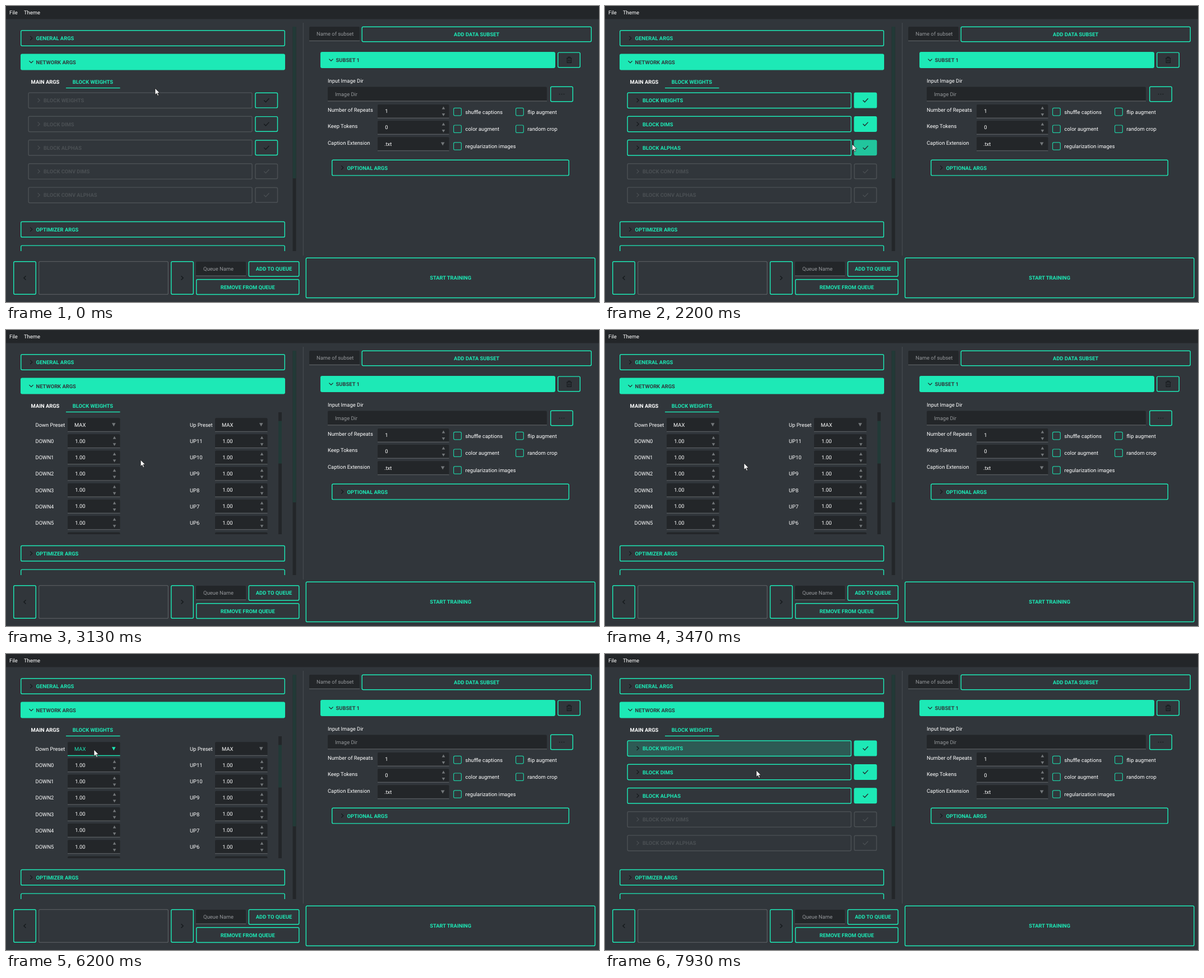
An HTML page for the animation above (8 s loop, 1058 px wide and 529 px high).

```html
<!DOCTYPE html>
<html lang="en">
<head>
<meta charset="utf-8">
<title>Training settings</title>
<style>
html, body { margin: 0; width: 100%; height: 100%; overflow: hidden; background: #31363b; }
svg { display: block; width: 1058px; height: 529px; }
text { font: 9.4px Roboto, sans-serif; fill: #fff; text-rendering: geometricPrecision; white-space: pre; }
.b { font-weight: 700; }
</style>
</head>
<body>
<svg viewBox="0 0 1058 529">
  <defs>
    <clipPath id="left"><rect x="0" y="30" width="530" height="408"/></clipPath>
    <clipPath id="panel"><rect x="26" y="147" width="468" height="218"/></clipPath>
    <clipPath id="combo"><rect x="110" y="140" width="65" height="240"/></clipPath>
  </defs>
  <g id="base"></g>
  <g id="live" clip-path="url(#panel)"></g>
  <path id="cursor" d="M0 0V11.6L2.7 9.1 4.6 13.4 6.5 12.6 4.6 8.4H8.2Z" fill="#fff" stroke="#111" stroke-width=".7"/>
</svg>
<script>
const LOOP = 8000;
const TEAL = '#1de9b6', BG = '#31363b', DARK = '#232629', INK = '#15191c';
const GREY = '#4b5054', LINE = '#565a5e', HINT = '#94979a', ARROW = '#73777a';
const $ = id => document.getElementById(id);

const rect = (x, y, w, h, fill, r = 0) =>
  `<rect x="${x}" y="${y}" width="${w}" height="${h}" rx="${r}" fill="${fill}"/>`;
const frame = (x, y, w, h, stroke = TEAL, fill = 'none', sw = 1.44) =>
  `<rect x="${x + sw / 2}" y="${y + sw / 2}" width="${w - sw}" height="${h - sw}" rx="2.2" fill="${fill}" stroke="${stroke}" stroke-width="${sw}"/>`;
const text = (x, y, s, fill = '#fff', cls = '', extra = '') =>
  `<text x="${x}" y="${y + 3.4}" class="${cls}" style="fill:${fill}" ${extra}>${s}</text>`;
const stroke = (d, color = INK, w = 1.2) =>
  `<path d="${d}" fill="none" stroke="${color}" stroke-width="${w}"/>`;
const tri = (x, y, w, h, color = ARROW) =>
  `<path d="M${x - w / 2} ${y - h / 2}h${w}l${-w / 2} ${h}z" fill="${color}"/>`;

const button = (x, y, w, h, label) => frame(x, y, w, h) +
  text(x + w / 2, y + h / 2, label, TEAL, 'b', 'text-anchor="middle"');
const chevron = (x, y, open, color) =>
  stroke(open ? `M${x - 3.6} ${y - 1.8}l3.6 3.6 3.6-3.6` : `M${x - 1.8} ${y - 3.6}l3.6 3.6-3.6 3.6`, color);

// Button looks: border, fill, label, icon
const LOOK = {
  off: [GREY, 'none', GREY, GREY],
  idle: [TEAL, 'none', TEAL, INK],
  focus: [TEAL, '#2d5a54', TEAL, INK],
  on: [TEAL, TEAL, BG, DARK],
  onFocus: ['#21c59d', '#21c59d', BG, DARK]
};
function header(x, y, w, label, look = 'idle') {
  const [border, fill, ink, icon] = LOOK[look];
  return frame(x, y, w, 29, border, fill) +
    chevron(x + 19, y + 14.4, look.startsWith('on'), icon) +
    text(x + 27.6, y + 14.6, label, ink, 'b');
}
function check(x, y, look) {
  const [border, fill, , icon] = LOOK[look];
  return frame(x, y + .4, 41, 28, border, fill) +
    stroke(`M${x + 16} ${y + 14.3}l3.2 3.2 6-6.4`, icon, 1.3);
}
const field = (x, y, w, h, line = LINE) =>
  rect(x, y, w, h, DARK, 2) + rect(x, y + h - 1.4, w, 1.4, line);
const input = (x, y, w, hint) => field(x, y, w, 26) + text(x + 13, y + 12.8, hint, HINT);
const spin = (x, cy, w, value) => field(x, cy - 12, w, 25) + text(x + 13.2, cy, value) +
  tri(x + w - 10, cy - 6, 5.6, -5) + tri(x + w - 10, cy + 6.4, 5.6, 5);
const combo = (x, cy, w, value, hot = false, extra = '') =>
  field(x, cy - 12, w, 25, hot ? TEAL : LINE) +
  text(x + 12, cy, value, hot ? TEAL : '#fff', '', extra) +
  tri(x + w - 11.3, cy + .2, 6.6, 6.2, hot ? TEAL : ARROW);
const box = (x, cy, label) =>
  frame(x, cy - 7, 15, 14.6, '#1fc9a0', 'none', 1.2) + text(x + 21.6, cy + .4, label);
const scrollbar = (x, y, h, top, len) => rect(x, y, 6, h, DARK) + rect(x, top, 6, len, '#223a37');

$('base').innerHTML =
  rect(0, 0, 1058, 529, BG) + rect(0, 0, 1058, 23.4, DARK) +
  text(6, 11.5, 'File') + text(32, 11.5, 'Theme') +
  `<g clip-path="url(#left)">` +
  header(26, 43, 472, 'GENERAL ARGS') + header(26, 85.5, 472, 'NETWORK ARGS', 'on') +
  text(44.6, 136, 'MAIN ARGS', '#fff', 'b') + text(118.8, 136, 'BLOCK WEIGHTS', TEAL, 'b') +
  rect(107, 145.8, 96.5, 1.4, TEAL) +
  header(26, 384.8, 472, 'OPTIMIZER ARGS') + header(26, 427.4, 472, '') +
  scrollbar(511.5, 37, 401, 37, 271) + '</g>' +
  rect(529.8, 30, 1, 416, '#4a4f54') +
  // queue row
  frame(13, 456, 41, 60) + stroke('M35.5 482.6l-3.6 3.4 3.6 3.4', INK, 1.4) +
  frame(58, 456, 232, 60, LINE, 'none', 1.3) +
  frame(294, 456, 41, 60) + stroke('M312.5 482.6l3.6 3.4-3.6 3.4', INK, 1.4) +
  input(339, 457, 89, 'Queue Name') +
  button(432.5, 456, 91, 28, 'ADD TO QUEUE') + button(339, 488, 184.5, 28.3, 'REMOVE FROM QUEUE') +
  button(534.6, 449.6, 517, 72.7, 'START TRAINING') +
  // data subset
  input(541, 37, 90, 'Name of subset') + button(634.5, 36.5, 410.5, 28, 'ADD DATA SUBSET') +
  header(561, 82, 419, 'SUBSET 1', 'on') + frame(984, 82.4, 41, 28) +
  stroke('M1000 93.2h9.6M1003 93v-1.6h3.6V93M1001.2 93.4v8h7.2v-8M1003.6 95.4v4M1006 95.4v4', INK, 1.1) +
  text(574, 134, 'Input Image Dir') + input(574, 144.6, 391, 'Image Dir') +
  frame(971, 143.5, 41, 28) +
  [987.6, 991.5, 995.4].map(x => rect(x - .7, 156.8, 1.5, 1.5, INK)).join('') +
  text(574, 186, 'Number of Repeats') + spin(663, 188, 127.5, '1') +
  text(574, 215, 'Keep Tokens') + spin(663, 217, 127.5, '0') +
  text(574, 244.3, 'Caption Extension') + combo(663, 246.3, 127.5, '.txt') +
  box(798, 188.8, 'shuffle captions') + box(909, 188.8, 'flip augment') +
  box(798, 219.4, 'color augment') + box(909, 219.4, 'random crop') +
  box(798, 250.2, 'regularization images') +
  header(581, 274.6, 424, 'OPTIONAL ARGS');

const BLOCKS = ['BLOCK WEIGHTS', 'BLOCK DIMS', 'BLOCK ALPHAS', 'BLOCK CONV DIMS', 'BLOCK CONV ALPHAS'];
const PRESETS = {
  MAX: () => 1,
  COSINE: k => Math.cos(k * Math.PI / 22),
  SINE: k => Math.sin(k * Math.PI / 22),
  LINEAR: k => k / 11,
  REVERSE_LINEAR: k => 1 - k / 11,
  ZEROS: () => 0
};
const NAMES = Object.keys(PRESETS);
const CLICKS = [1130, 1620, 2030];
const OPEN = 2670, SCROLL = 3100, BACK = 6960, CLOSE = 7330;

// Pointer stops: time, x, y
const PATH = [
  [0, 266, 147], [900, 466, 168], [1230, 464, 170], [1400, 450, 197], [1560, 459, 211],
  [1720, 459, 212], [1950, 459, 252], [2120, 459, 253], [2590, 230, 176], [2700, 230, 177],
  [2870, 238, 227], [3100, 240, 232], [3470, 248, 238], [4080, 157, 171], [6430, 157, 171],
  [6600, 192, 157], [6800, 231, 178], [7400, 231, 178], [7730, 255, 200], [7800, 255, 200],
  [7930, 270, 208], [8000, 270, 208]
];
function pointer(t) {
  const i = PATH.findIndex(p => p[0] > t);
  const [t0, x0, y0] = PATH[i - 1], [t1, x1, y1] = PATH[i];
  const u = (t - t0) / (t1 - t0), e = u * u * (3 - 2 * u);
  return [x0 + (x1 - x0) * e, y0 + (y1 - y0) * e];
}

function closedList(clicks, collapsed) {
  return BLOCKS.map((name, i) => {
    const y = 154.2 + i * 42.3, on = i < clicks;
    const look = !on ? 'off' : collapsed && i === 0 ? 'focus' : 'idle';
    const mark = i > 2 ? 'off' : !on ? 'idle' : !collapsed && i === clicks - 1 ? 'onFocus' : 'on';
    return header(39.4, y, 400.4, name, look) + check(444.2, y, mark);
  }).join('');
}
function openList(scrolled, preset, hot, focused) {
  const name = NAMES[preset];
  let rows = header(39.4, 154.2, 394.6, BLOCKS[0], focused ? 'onFocus' : 'on') + check(438.6, 154.2, 'on') +
    text(52.5, 213.3, 'Down Preset') + combo(110, 213, 93.5, name, hot, 'clip-path="url(#combo)"') +
    text(328, 213.3, 'Up Preset') + combo(373, 213, 93.5, 'MAX');
  for (let k = 0; k < 7; k++) {
    const y = 242.1 + k * 29.2;
    rows += text(52.5, y + .4, 'DOWN' + k) + spin(110, y, 93.5, PRESETS[name](k).toFixed(2)) +
      text(328, y + .4, 'UP' + (11 - k)) + spin(373, y, 93.5, '1.00');
  }
  return `<g transform="translate(0 ${scrolled ? -43.8 : 0})">${rows}</g>` +
    scrollbar(486, 147, 218, scrolled ? 162.6 : 147, 76);
}

let last = '';
function draw(t) {
  const [x, y] = pointer(t);
  $('cursor').setAttribute('transform', `translate(${x.toFixed(2)} ${y.toFixed(2)})`);
  const open = t >= OPEN && t < CLOSE;
  const scrolled = t >= SCROLL && t < BACK;
  const clicks = CLICKS.filter(c => t >= c).length;
  // one wheel notch every 400 ms, wrapping back to MAX
  const preset = t < 4200 || t >= 6200 ? 0 : 1 + Math.floor((t - 4200) / 400);
  const hot = scrolled && x > 110 && x < 203 && y > 156 && y < 182;
  const key = [open, scrolled, clicks, preset, hot, t >= CLOSE].join();
  if (key === last) return;
  last = key;
  $('live').innerHTML = open ? openList(scrolled, preset, hot, t < 4200) : closedList(clicks, t >= CLOSE);
}

const start = performance.now();
function tick() {
  draw((performance.now() - start) % LOOP);
  requestAnimationFrame(tick);
}
tick();
</script>
</body>
</html>
```
